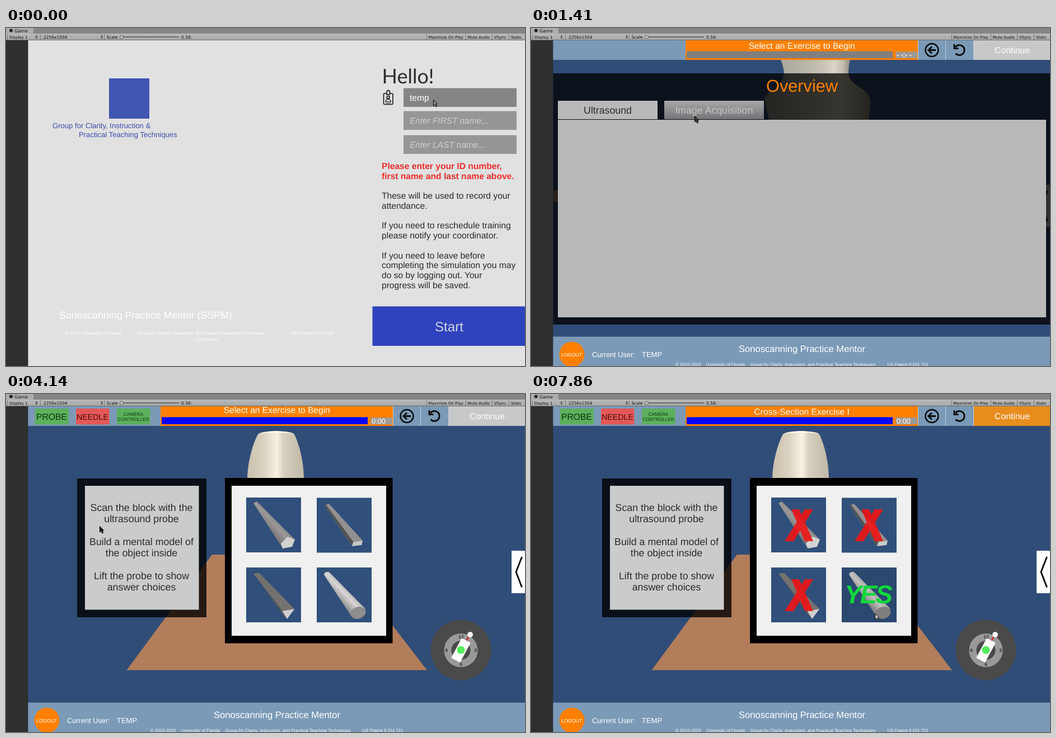
An HTML page for the animation above (8 s loop, 927 by 604 pixels).

```html
<!DOCTYPE html>
<html lang="en">
<head>
<meta charset="utf-8">
<title>Ultrasound training walkthrough</title>
<style>
html, body { margin: 0; width: 100%; height: 100%; overflow: hidden; background: #2f2f2f; }
svg { display: block; width: 927px; height: 604px; }
text { font-family: "Liberation Sans", Arial, sans-serif; fill: #fff; white-space: pre; text-rendering: geometricPrecision; }
.mid { text-anchor: middle; }
.chrome text { font: 7px "DejaVu Sans", sans-serif; fill: #111; }
.info text { font-size: 15.6px; fill: #2b2b2b; }
.info .warn { font-weight: bold; fill: #f02c2c; }
.hint { font-size: 15.4px; font-style: italic; fill: #d0d0d0; }
.small { font-size: 8px; }
.list text { font-size: 13.33px; fill: #2a00ea; }
.task text { font-size: 17.8px; fill: #2c2c2c; text-anchor: middle; }
.tab { font-size: 17.75px; text-anchor: middle; }
.dial text { font-size: 8.5px; font-weight: bold; fill: #333; text-anchor: middle; }
.title { font-size: 15.55px; text-anchor: middle; }

/* one shared 8 s clock; every change is a hard step */
.a { animation: 8s step-end -3ms infinite; }
.login { animation-name: login; }
.training { animation-name: training; }
.overview { animation-name: overview; }
.exercise { animation-name: exercise; }
.panels { animation-name: panels; }
.tabs1 { animation-name: tabs1; }
.tabs2 { animation-name: tabs2; }
.pick { animation-name: pick; }
.named { animation-name: named; }
.chosen { animation-name: chosen; }
.wrong1 { animation-name: wrong1; }
.wrong2 { animation-name: wrong2; }
.wrong3 { animation-name: wrong3; }
.right { animation-name: right; }
.next { animation-name: next; }
.cursor { animation-name: cursor; stroke: #0a0a0a; stroke-width: 1; stroke-linejoin: round; }

@keyframes login { 0% { opacity: 1 } 9.125%, 100% { opacity: 0 } }
@keyframes training { 0% { opacity: 0 } 9.125%, 100% { opacity: 1 } }
@keyframes overview { 0% { opacity: 0 } 9.125% { opacity: 1 } 51.75%, 100% { opacity: 0 } }
@keyframes exercise { 0% { opacity: 0 } 51.75%, 100% { opacity: 1 } }
@keyframes panels { 0% { opacity: 1 } 10.625%, 100% { opacity: 0 } }
@keyframes tabs1 { 0% { opacity: 0 } 10.625% { opacity: 1 } 22.625%, 100% { opacity: 0 } }
@keyframes tabs2 { 0% { opacity: 0 } 22.625%, 100% { opacity: 1 } }
@keyframes pick {
  0% { transform: none; opacity: 1 }
  51.75% { transform: translateY(-3px) }
  53.625% { transform: translateY(-7px) }
  55.125% { transform: translateY(-11px) }
  57% { transform: translateY(-15px); opacity: 1 }
  58.5%, 100% { opacity: 0 }
}
@keyframes named {
  0% { opacity: 0; transform: translateY(4px) }
  58.5% { opacity: 1; transform: translateY(4px) }
  60.375%, 100% { opacity: 1; transform: none }
}
@keyframes chosen {
  0% { opacity: 0; transform: none }
  61.875% { opacity: .1; transform: none }
  73% { opacity: .1; transform: translate(0, 125px) }
  85% { opacity: .1; transform: translate(126px, 0) }
  91.75%, 100% { opacity: .1; transform: translate(126px, 125px) }
}
@keyframes wrong1 { 0% { opacity: 0 } 63.375%, 100% { opacity: .9 } }
@keyframes wrong2 { 0% { opacity: 0 } 74.875%, 100% { opacity: .9 } }
@keyframes wrong3 { 0% { opacity: 0 } 85%, 100% { opacity: .9 } }
@keyframes right { 0% { opacity: 0 } 93.375%, 100% { opacity: 1 } }
@keyframes next { 0% { fill: #c7c8c8 } 94.875% { fill: #d8aa70 } 98.25%, 100% { fill: #e88d1d } }
@keyframes cursor {
  0% { transform: translate(763px, 128px); fill: #8a8a8a }
  1.5% { transform: translate(765px, 176px); fill: #8a8a8a }
  3% { transform: translate(770px, 330px); fill: #8a8a8a }
  4.5% { transform: translate(774px, 480px); fill: #8a8a8a }
  6% { transform: translate(776px, 544px); fill: #c9b68c }
  12.5% { transform: translate(300px, 201px); fill: #333 }
  14.25% { transform: translate(282px, 169px); fill: #333 }
  16.125% { transform: translate(283px, 160px); fill: #333 }
  17.625% { transform: translate(292px, 157px); fill: #333 }
  28.75% { transform: translate(335px, 202px); fill: #333 }
  30.625% { transform: translate(362px, 232px); fill: #333 }
  32.125% { transform: translate(390px, 262px); fill: #333 }
  33.625% { transform: translate(408px, 284px); fill: #333 }
  35.125% { transform: translate(417px, 293px); fill: #333 }
  37% { transform: translate(421px, 315px); fill: #333 }
  38.5% { transform: translate(340px, 302px); fill: #333 }
  40% { transform: translate(225px, 268px); fill: #333 }
  41.5% { transform: translate(157px, 242px); fill: #333 }
  43.375% { transform: translate(167px, 221px); fill: #333 }
  45.25% { transform: translate(167px, 231px); fill: #d8d020 }
  46.75% { transform: translate(167px, 236px); fill: #d8d020 }
  51.75% { transform: translate(167px, 236px); fill: #222 }
  53.625% { transform: translate(222px, 290px); fill: #222 }
  55.125% { transform: translate(298px, 314px); fill: #222 }
  57% { transform: translate(360px, 302px); fill: #999 }
  58.5% { transform: translate(411px, 268px); fill: #999 }
  60.375% { transform: translate(440px, 250px); fill: #ccc }
  61.875% { transform: translate(461px, 238px); fill: #ccc }
  69.625% { transform: translate(468px, 310px); fill: #ccc }
  71.125% { transform: translate(474px, 361px); fill: #ccc }
  73% { transform: translate(478px, 369px); fill: #ccc }
  80.375% { transform: translate(556px, 296px); fill: #ccc }
  81.875% { transform: translate(639px, 220px); fill: #ccc }
  85% { transform: translate(638px, 257px); fill: #ccc }
  88.375% { transform: translate(643px, 310px); fill: #ccc }
  89.875% { transform: translate(650px, 383px); fill: #ccc }
  91.75% { transform: translate(632px, 385px); fill: #ccc }
  93.375% { transform: translate(622px, 387px); fill: #ccc }
  98.25%, 100% { transform: translate(614px, 392px); fill: #ccc }
}
</style>
</head>
<body>
<svg viewBox="0 0 927 604">
  <defs>
    <linearGradient id="bar" y2="1" x2="0"><stop stop-color="#bababa"/><stop offset="1" stop-color="#a6a6a6"/></linearGradient>
    <linearGradient id="idle" x2="0" y2="1"><stop stop-color="#a8a8a8"/><stop offset="1" stop-color="#747477"/></linearGradient>
    <linearGradient id="bone">
      <stop stop-color="#c9c1ae"/><stop offset=".3" stop-color="#dbd3c1"/><stop offset=".45" stop-color="#efe8d6"/>
      <stop offset=".53" stop-color="#f8f1df"/><stop offset=".64" stop-color="#d8d0be"/><stop offset="1" stop-color="#c0b8a7"/>
    </linearGradient>
    <linearGradient id="neck">
      <stop stop-color="#aaa69b"/><stop offset=".6" stop-color="#c6c1b4"/><stop offset=".77" stop-color="#dad5c7"/>
      <stop offset=".9" stop-color="#c0bbae"/><stop offset="1" stop-color="#8f8b80"/>
    </linearGradient>
    <linearGradient id="dark">
      <stop stop-color="#242422"/><stop offset=".5" stop-color="#302f2b"/><stop offset=".72" stop-color="#37352f"/><stop offset="1" stop-color="#25241f"/>
    </linearGradient>
    <linearGradient id="rod" y1="1" x2="1" y2="0">
      <stop offset=".32" stop-color="#6d6b6b"/><stop offset=".5" stop-color="#9a9898"/><stop offset=".66" stop-color="#777575"/>
    </linearGradient>
    <linearGradient id="tube" y1="1" x2="1" y2="0">
      <stop offset=".3" stop-color="#777"/><stop offset=".5" stop-color="#d8d6d6"/><stop offset=".7" stop-color="#8c8a8c"/>
    </linearGradient>
    <path id="cross" d="M12 0H26L51 57H36ZM36 0H51L16 57H0Z" fill="#f01414"/>
    <rect id="tile" width="98" height="98" fill="#30507b"/>
  </defs>

  <rect width="927" height="604" fill="#2f2f2f"/>

  <!-- sign-in -->
  <g class="a login">
    <rect x="39.5" y="22" width="888" height="582" fill="#e1e1e1"/>
    <rect x="184" y="90" width="72" height="72" fill="#4056b2"/>
    <g style="font-size:13.1px">
      <text x="83" y="179" style="fill:#3a4db0">Group for Clarity, Instruction &amp;</text>
      <text x="130" y="195" style="fill:#3a4db0">Practical Teaching Techniques</text>
    </g>
    <text x="671.5" y="98.5" style="font:36px Lato,sans-serif;fill:#2b2b2b">Hello!</text>
    <g fill="none" stroke="#111" stroke-width="1.6">
      <rect x="674.5" y="117" width="16.5" height="19.5" rx="2"/>
      <path d="M680 119V115Q680 111.5 682.7 111.5T685.5 115V119Z" fill="#e1e1e1"/>
      <circle cx="682.7" cy="124" r="2.5"/>
      <path d="M678 131.5Q678 127.5 682.7 127.5T687.5 131.5ZM678 134H687.5" stroke-width="1.2"/>
    </g>
    <rect x="710" y="107.5" width="202" height="33.5" fill="#858585"/>
    <rect x="710" y="148.5" width="202" height="33.5" fill="#969696"/>
    <rect x="710" y="191.5" width="202" height="33.5" fill="#969696"/>
    <text x="721" y="129.5" font-size="15.6">temp</text>
    <text class="hint" x="721" y="170.5">Enter FIRST name...</text>
    <text class="hint" x="721" y="213.5">Enter LAST name...</text>
    <g class="info">
      <text class="warn" x="671" y="252">Please enter your ID number,<tspan x="671" dy="17.75">first name and last name above.</tspan></text>
      <text x="671" y="305.2">These will be used to record your<tspan x="671" dy="17.75">attendance.</tspan></text>
      <text x="671" y="358.4">If you need to reschedule training<tspan x="671" dy="17.75">please notify your coordinator.</tspan></text>
      <text x="671" y="411.7">If you need to leave before<tspan x="671" dy="17.75">completing the simulation you may</tspan><tspan x="671" dy="17.75">do so by logging out. Your</tspan><tspan x="671" dy="17.75">progress will be saved.</tspan></text>
    </g>
    <rect x="654.5" y="497.5" width="273" height="70.5" fill="#3043be"/>
    <text class="mid" x="791.5" y="541.5" style="font-size:24.1px;fill:#d2d4e2">Start</text>
    <text x="95" y="519" font-size="17.76">Sonoscanning Practice Mentor (SSPM)</text>
    <text class="small" x="107" y="548">© 2023 University of Florida</text>
    <text class="small" x="235" y="548">Group for Clarity, Instruction, and Practical Teaching Techniques</text>
    <text class="small" x="510" y="548">US Patent 9,251,721</text>
    <text class="mid" x="357.5" y="558.5" font-size="6.5">v1.0917201012</text>
  </g>

  <!-- exercise picker -->
  <g class="a overview">
    <rect x="39.5" y="22" width="888" height="582" fill="#304d78"/>
    <path d="M446 57H570Q567 68 567 81H452Q451 68 446 57Z" fill="url(#neck)"/>
    <rect x="39.5" y="81" width="888" height="449" fill="#0b121c"/>
    <path d="M452 81H567C569 105 603 105 607 131L603 164H425L417 128C421 108 449 110 452 81Z" fill="url(#dark)"/>
    <path d="M39.5 290H48V311H39.5Z" fill="#2a1f1a"/>
    <rect x="919" y="280" width="8" height="76" fill="#303033"/>
    <path d="M922 291L912 318L922 345" fill="none" stroke="#000" stroke-width="3"/>
    <g class="a panels">
      <rect x="862" y="105" width="65" height="425" fill="#1c1f29"/>
      <g fill="#2b2b2d">
        <rect x="872" y="151" width="53" height="35"/>
        <rect x="872" y="200" width="53" height="35"/>
        <rect x="872" y="249" width="53" height="134"/>
        <rect x="872" y="397" width="53" height="35"/>
        <rect x="872" y="446" width="53" height="35"/>
      </g>
      <path d="M927 290L917 318L927 345" fill="none" stroke="#000" stroke-width="3"/>
      <path d="M862 530H927" stroke="#8a96a8"/>
    </g>
    <text class="mid" x="484" y="114" style="font-size:30.7px;fill:#ff8000">Overview</text>
    <rect x="48" y="164" width="872" height="353" fill="#b9b9b9"/>
    <g class="a tabs1">
      <rect x="48" y="130" width="178" height="33" fill="#b9b9b9"/>
      <rect x="238" y="130" width="178" height="33" fill="url(#idle)"/>
      <text class="tab" x="137" y="153" style="fill:#2d2d2d">Ultrasound</text>
      <text class="tab" x="327" y="153" style="fill:#c4c4c4">Image Acquisition</text>
    </g>
    <g class="a tabs2">
      <rect x="48" y="130" width="178" height="33" fill="url(#idle)"/>
      <rect x="238" y="130" width="178" height="33" fill="#b9b9b9"/>
      <text class="tab" x="137" y="153" style="fill:#c4c4c4">Ultrasound</text>
      <text class="tab" x="327" y="153" style="fill:#2d2d2d">Image Acquisition</text>
      <g class="list">
        <text x="59" y="206.8">1. Learning Objectives: Image Acquisition<tspan x="59" dy="38.9">2. Cross-Section Exercise I</tspan><tspan x="59" dy="38.9">3. Cross-Section Exercise II</tspan><tspan x="59" dy="38.9">4. Cross-Section Exercise III</tspan><tspan x="59" dy="38.9">5. Cross-Section Exercise IV</tspan><tspan x="59" dy="38.9">6. Cross-Section Exercise V</tspan><tspan x="59" dy="38.9">7. Cross-Section Exercise VI</tspan><tspan x="59" dy="38.9">8. Cross-Section Exercise VII</tspan></text>
        <text x="348" y="206.8">9. Cross-Section Exercise VIII<tspan x="348" dy="38.9">10. Cross-Section Exercise IX</tspan><tspan x="348" dy="38.9">11. Cross-Section Exercise X</tspan><tspan x="348" dy="38.9">12. Cross-Section Exercise XIII</tspan><tspan x="348" dy="38.9">13. Cross-Section Exercise XIV</tspan><tspan x="348" dy="38.9">14. Trace Objects Exercise XII</tspan><tspan x="348" dy="38.9">15. Trace Objects Exercise XVIII</tspan><tspan x="348" dy="38.9">16. Trace Objects Exercise XIX</tspan></text>
        <text x="637.3" y="206.8">17. Trace Objects Exercise XX<tspan x="637.3" dy="38.9">18. Cross-Section Exercise XV</tspan><tspan x="637.3" dy="38.9">19. Cross-Section Exercise XVI</tspan></text>
      </g>
    </g>
  </g>

  <!-- exercise -->
  <g class="a exercise">
    <rect x="39.5" y="22" width="888" height="582" fill="#304d78"/>
    <path d="M368 287H593L752 493.5H215.5Z" fill="#b27d5b"/>
    <path d="M431 152C431 125 440 90 450 72Q455 67 482 66Q510 67 515 72C524 90 532 122 532 152Z" fill="url(#bone)"/>
    <path d="M452 71Q460 67 482 66.5Q508 67 514 71Q500 68.5 484 69Q465 69 452 71Z" fill="#fbf6e8"/>
    <rect x="127" y="151" width="231" height="248" fill-opacity=".79"/>
    <rect x="141" y="164" width="203.5" height="221.5" fill="#cacccb"/>
    <g class="task">
      <text x="242" y="208.5">Scan the block with the<tspan x="242" dy="20.4">ultrasound probe</tspan></text>
      <text x="242" y="269.8">Build a mental model of<tspan x="242" dy="20.4">the object inside</tspan></text>
      <text x="242" y="331">Lift the probe to show<tspan x="242" dy="20.4">answer choices</tspan></text>
    </g>
    <rect x="391" y="150" width="299.5" height="295.5"/>
    <rect x="403" y="164" width="276" height="268" fill="#f0f0f0"/>
    <use href="#tile" x="429" y="185"/><use href="#tile" x="555" y="185.5"/>
    <use href="#tile" x="429" y="310"/><use href="#tile" x="555" y="310"/>

    <path d="M442 195L448 192L515 259L491 271Z" fill="url(#rod)"/>
    <path d="M491 271L499 257L515 259L514 266L496 276Z" fill="#8f8d8d"/>
    <path d="M491 267L503 255L516 260L511 273L494 276Z" fill="#d2d2d2"/>

    <path d="M569 199L577 196L637 262L618 272Z" fill="#929090"/>
    <path d="M569 199L571 197L621 265L618 272Z" fill="#555354"/>
    <path d="M620 265L637 262L635 270L618 272Z" fill="#c9c9c9"/>

    <path d="M442 321L452 319.5L515 384L494 388Z" fill="#747271"/>
    <path d="M442 321L494 388L502 402L495 395Z" fill="#565556"/>
    <path d="M493.5 388L515.5 384L502 402Z" fill="#cfcfcf"/>

    <path d="M568 323Q569 317 577 318L642 384L616 396Z" fill="url(#tube)"/>
    <ellipse cx="629" cy="391" rx="13.8" ry="10.5" transform="rotate(-18 629 391)" fill="#8f8d8d"/>

    <rect class="a chosen" x="429" y="185" width="98" height="98"/>
    <use class="a wrong1" href="#cross" x="453" y="206"/>
    <use class="a wrong2" href="#cross" x="453" y="331"/>
    <use class="a wrong3" href="#cross" x="578" y="206"/>
    <text class="a right" x="560" y="374" style="font-size:46px;font-weight:bold;font-style:italic;fill:#10d83c;letter-spacing:-3px">YES</text>

    <rect x="903" y="280" width="24" height="76" fill="#fff"/>
    <path d="M921.5 291L911 318L921.5 345.5" fill="none" stroke="#000" stroke-width="2.8"/>

    <g class="dial">
      <circle cx="812.5" cy="457.5" r="54" fill="#4a4a4a"/>
      <circle cx="812.5" cy="458" r="23.5" fill="none" stroke="#999" stroke-width="13"/>
      <text x="813" y="437">12</text><text x="838.5" y="461">3</text>
      <text x="812.5" y="486">6</text><text x="786.5" y="461">9</text>
      <path d="M822 442L828 431" stroke="#e02020" stroke-width="2.5"/>
      <rect x="803.5" y="438" width="18" height="40" rx="1.5" transform="rotate(28 812.5 458)" fill="#fff"/>
      <circle cx="812.5" cy="457.5" r="7" fill="#55f05a"/>
      <circle cx="829" cy="430" r="5" fill="#fff"/>
    </g>
  </g>

  <!-- header and footer shared by both training screens -->
  <g class="a training">
    <rect x="39.5" y="22" width="888" height="35" fill="#7b9ab7"/>
    <rect x="39.5" y="551.5" width="888" height="53" fill="#7b9ab7"/>
    <rect x="276" y="22" width="415" height="35" fill="#ff8000"/>
    <text class="title a pick" x="483.7" y="36.7">Select an Exercise to Begin</text>
    <text class="title a named" x="483.7" y="36.7">Cross-Section Exercise I</text>
    <rect x="278" y="41.5" width="368" height="12.5" fill="#808080"/>
    <rect x="651.5" y="42" width="38.5" height="12" fill="#a09a94"/>
    <g class="a overview"><text x="653" y="52" style="font-size:12px;font-weight:bold">- -:- -</text></g>
    <g class="a exercise">
      <rect x="278" y="41.5" width="368" height="12.5" fill="#00f"/>
      <text class="mid" x="665.5" y="52.5" font-size="12.8">0:00</text>
      <rect x="52" y="26" width="60" height="28.5" fill="#5cb05c"/>
      <rect x="125" y="26" width="59.5" height="28.5" fill="#e45858"/>
      <rect x="198" y="26" width="59.5" height="28.5" fill="#5cb05c"/>
      <text class="mid" x="81.5" y="46" style="font-size:15.7px;fill:#0b350b">PROBE</text>
      <text class="mid" x="154.5" y="45.5" style="font-size:14.2px;fill:#4d0808">NEEDLE</text>
      <text class="mid" x="227.5" y="39" style="font-size:8.3px;fill:#0b350b">CAMERA<tspan x="227.5" dy="9">CONTROLLER</tspan></text>
    </g>
    <path d="M691.5 22V57M740.5 22V57M790.5 22V57" stroke="#c3d0dc"/>
    <g fill="none" stroke="#080808" stroke-width="2.4">
      <circle cx="716" cy="39.5" r="11.5"/>
      <path d="M723 39.5H711M716 33.5L710 39.5L716 45.5" stroke-width="3"/>
      <path d="M758 34A9 9 0 1 1 758.5 45.5M756 29V36.5H763.5" stroke-width="2.8"/>
    </g>
    <rect class="a next" x="791" y="22" width="136" height="35"/>
    <text class="mid" x="859.5" y="45.3" font-size="15.7">Continue</text>
    <circle cx="73" cy="583" r="22.5" fill="#ff8000"/>
    <text class="mid" x="72.7" y="586.5" font-size="8.8">LOGOUT</text>
    <text x="109" y="588" font-size="12.8">Current User:</text>
    <text x="198" y="588" font-size="13">TEMP</text>
    <text class="mid" x="484" y="579" font-size="16.6">Sonoscanning Practice Mentor</text>
    <g style="font-size:7.9px">
      <text x="258" y="603.5">© 2010-2023</text>
      <text x="312.5" y="603.5">University of Florida</text>
      <text x="391.5" y="603.5">Group for Clarity, Instruction, and Practical Teaching Techniques</text>
      <text x="636.5" y="603.5">US Patent 9,251,721</text>
    </g>
  </g>

  <!-- editor chrome -->
  <g class="chrome">
    <rect width="927" height="10" fill="#858585"/>
    <rect width="49" height="10" fill="#adadad"/>
    <rect y="10" width="927" height="12" fill="url(#bar)"/>
    <path d="M0 21.5H927" stroke="#6b6b6b"/>
    <circle cx="9" cy="4.5" r="3" fill="#222"/>
    <text x="15" y="7.5" style="font-size:8px">Game</text>
    <text x="6" y="18.5">Display 1</text>
    <text x="67" y="18.5" style="font-size:7.5px">2256x1504</text>
    <text x="179.5" y="18.5" style="font-size:7.5px">Scale</text>
    <text x="313" y="18.5" style="font-size:7.5px">0.56:</text>
    <text x="754.5" y="18.5">Maximize On Play</text>
    <text x="824.5" y="18.5">Mute Audio</text>
    <text x="872" y="18.5">VSync</text>
    <text x="902" y="18.5">Stats</text>
    <path d="M2.5 11V21M61.5 11V21M175.5 11V21M751.5 11V21M821.5 11V21M868.5 11V21M898.5 11V21" stroke="#777"/>
    <path d="M52.5 15.2L54.5 12.8L56.5 15.2ZM52.5 16.8L54.5 19.2L56.5 16.8ZM169 15.2L171 12.8L173 15.2ZM169 16.8L171 19.2L173 16.8Z" fill="#333"/>
    <path d="M206 16H309" stroke="#555" stroke-width="1.5"/>
    <circle cx="206.5" cy="16" r="3" fill="#c8c8c8" stroke="#555"/>
  </g>

  <path class="a cursor" d="M.5 .5V11L2.8 8.8L4.9 13L6.8 12L4.7 8H7.8Z"/>
</svg>
</body>
</html>
```
